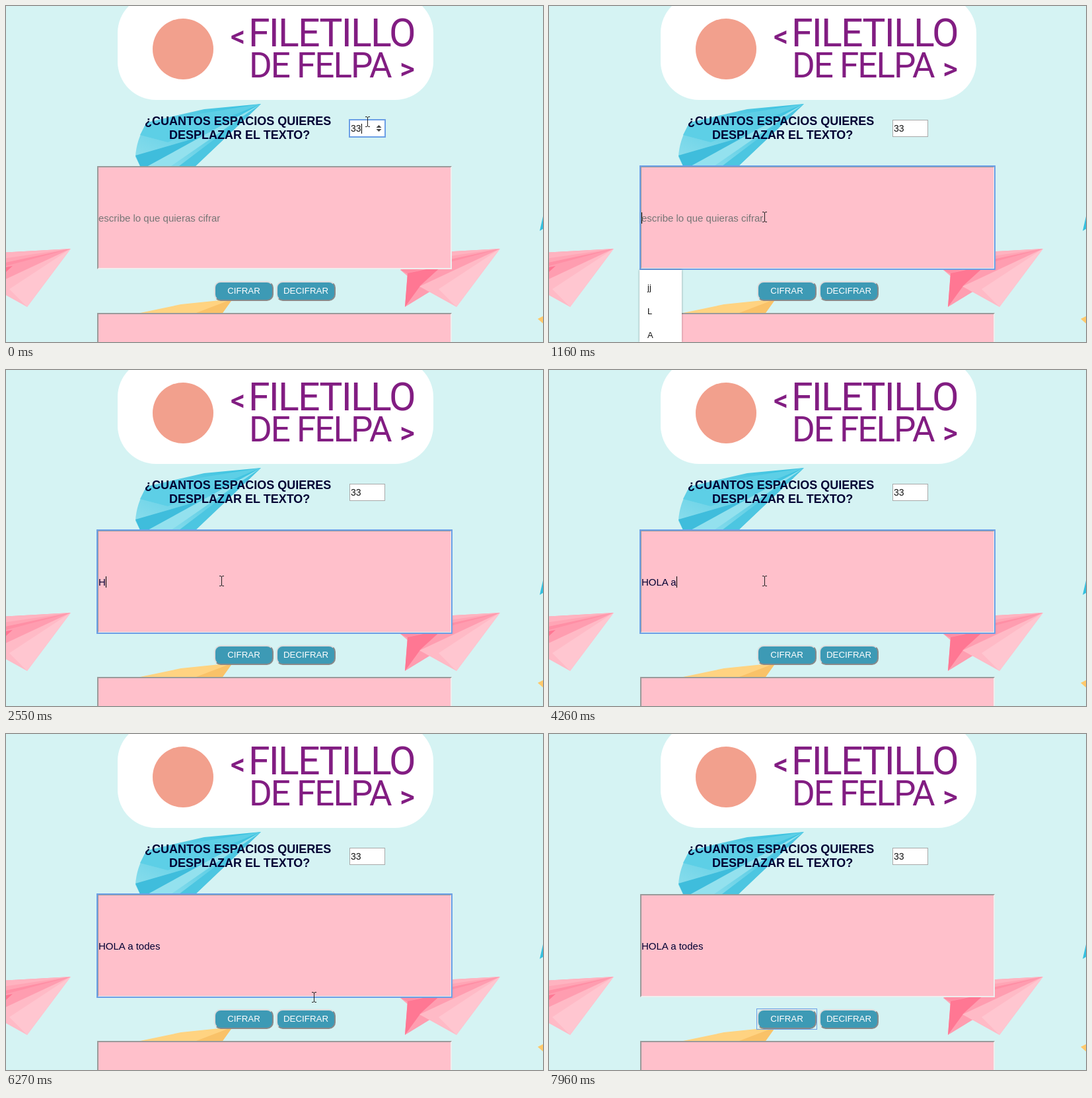
Write an HTML page that moves like this. It is 813 px wide and 508 px high and loops after 8000 ms.

```html
<!DOCTYPE html>
<html lang="es">
<head>
<meta charset="utf-8">
<title>Cifrado</title>
<style>
  html, body { margin: 0; width: 100%; height: 100%; overflow: hidden; background: #d5f3f3; }
  body { position: relative; font-family: "Liberation Sans", Arial, sans-serif; }
  svg, div { position: absolute; box-sizing: border-box; }
  svg { left: 0; top: 0; display: block; }
  .logo { font-family: Roboto, sans-serif; fill: #821d82; }
  .heading { font-size: 18px; font-weight: bold; fill: #000033; }
  .box { left: 138px; width: 537px; height: 156px; background: #ffc0cb; border: 2px inset #eee; }
  #result { top: 464px; height: 44px; border-bottom: 0; }
  .ring { border: 2px solid #6c9fe6; }
  .line { white-space: pre; color: #000033; }
  .line i { display: inline-block; width: 1px; margin-right: -1px; background: #000; vertical-align: top; }
  #message { left: 140px; top: 312px; font-size: 15px; line-height: 17px; }
  #message i { height: 17px; }
  #hint { color: #757575; }
  #number { left: 520px; top: 172px; width: 54px; height: 26px; background: #fff; border: 1px solid #a9a9a9; }
  #shift { left: 522px; top: 178px; font-size: 14px; line-height: 15px; color: #111; }
  #shift i { height: 15px; }
  .button { top: 416px; width: 90px; height: 30px; border: 2px outset #ddd; border-radius: 10px;
    background: #3d9ab5; color: #fff; font-size: 13.333px; line-height: 26px; text-align: center; }
  #menu { left: 137px; top: 399px; width: 64px; height: 109px; background: #fff;
    box-shadow: 0 0 3px rgba(0,0,0,.35); font-size: 13px; line-height: 36px; padding: 9px 12px 0; color: #111;
    overflow: hidden; }
</style>
</head>
<body>
<svg width="813" height="508">
  <defs>
    <g id="pinkPlane">
      <path fill="#ffa5b5" d="M748 367L625 374L597 399L626 424Z"/>
      <path fill="#ffb3c0" d="M748 367L640 373L618 386Z"/>
      <path fill="#ff8fa5" d="M748 367L597 399L610 406L626 414Z"/>
      <path fill="#ff9db0" d="M748 367L604 455L608 404Z"/>
      <path fill="#ff7793" d="M660 393L608 404L604 455L628 422Z"/>
      <path fill="#ffbac6" d="M748 367L626 424L682 455Z"/>
      <path fill="#ffc6d0" d="M748 367L655 428L682 455Z"/>
    </g>
    <linearGradient id="cyan" x1="0" y1="1" x2="1" y2="0">
      <stop offset="0" stop-color="#8fdfed"/><stop offset="1" stop-color="#35c0df"/>
    </linearGradient>
  </defs>
  <path fill="url(#cyan)" d="M386 148L300 156L213 176Q197 203 196 228L203 242H287Z"/>
  <path fill="#5dcfe6" d="M386 148L213 176L203 195L245 206Z"/>
  <path fill="#3fbddc" d="M300 196L196 226L203 242H215Z"/>
  <path fill="#93e1ee" d="M386 148L215 242H250Z"/>
  <path fill="#4cc6e1" d="M386 148L262 242H287Z"/>
  <path fill="#35c0df" d="M813 318L808 340L813 337Z"/>
  <use href="#pinkPlane"/>
  <use href="#pinkPlane" x="-650"/>
  <path fill="#ffd381" d="M343 443L265 451L203 464H328Z"/>
  <path fill="#f9c268" d="M343 443L288 464H328Z"/>
  <path fill="#ffc96b" d="M813 469L805 473L813 480Z"/>

  <rect x="169" y="-17" width="478" height="159" rx="58" fill="#fff"/>
  <circle cx="268" cy="65" r="46" fill="#f2a08d"/>
  <g class="logo">
    <text x="340" y="61" font-size="44" font-weight="500">&lt;</text>
    <text x="367" y="61" font-size="59" letter-spacing="-1.8">FILETILLO</text>
    <text x="368" y="108" font-size="53" letter-spacing="-2">DE FELPA</text>
    <text x="596" y="110" font-size="44" font-weight="500">&gt;</text>
  </g>
  <text class="heading" x="210" y="180">¿CUANTOS ESPACIOS QUIERES</text>
  <text class="heading" x="247" y="201">DESPLAZAR EL TEXTO?</text>
</svg>

<div id="number"></div>
<div id="shift" class="line">33<i></i></div>
<div id="numberRing" class="ring" style="left:519px;top:171px;width:56px;height:28px"></div>
<div class="box" style="top:242px"></div>
<div id="messageRing" class="ring" style="left:137px;top:241px;width:539px;height:158px"></div>
<div id="message" class="line"><span id="typed"></span><i></i><span id="hint">escribe lo que quieras cifrar</span></div>
<div class="box" id="result"></div>
<div class="button" id="encrypt" style="left:315px">CIFRAR</div>
<div class="button" style="left:409px">DECIFRAR</div>
<div id="buttonRing" class="ring" style="left:314px;top:415px;width:92px;height:32px;border-width:1px"></div>
<div id="menu">jj<br>L<br>A</div>

<svg width="813" height="508">
  <path id="spinner" fill="#444" d="M560.5 184L564.5 180L568.5 184ZM560.5 186L564.5 190L568.5 186Z"/>
  <path id="beam" fill="none" stroke="#222" d="M-3 -7.5H-1L.5 -6.5L2 -7.5H4M.5 -7V7M-3 7.5H-1L.5 6.5L2 7.5H4"/>
  <path id="arrow" fill="#fff" stroke="#000" d="M.5 .5V16.2L4.2 12.8L6.6 18.4L9 17.4L6.6 11.9H11.4Z"/>
</svg>

<script>
  const LOOP = 8000;
  const MESSAGE = "HOLA a todes";
  const KEY_TIMES = [2550, 2680, 3400, 3520, 3960, 4260, 4530, 4780, 5060, 5190, 5320, 5580];
  const CARET_OFF = [[1700, 2250], [3270, 3400], [6000, 6570]];
  // time, pointer shape, position
  const POINTER = [
    [0, "beam", 547, 175], [430, "arrow", 486, 214], [560, "beam", 421, 259],
    [710, "beam", 418, 261], [860, "beam", 371, 291], [1010, "beam", 329, 318],
    [1160, "beam", 326, 319], [6120, "arrow", 416, 403], [6270, "beam", 466, 398],
    [6420, "arrow", 393, 447], [6570, "arrow", 384, 441], [6700, "arrow", 375, 436],
    [6860, "arrow", 371, 434], [7560, "arrow", 431, 65], [7710, "arrow", 445, 30],
    [7835, "arrow", 450, 4], [7960, "none", 0, 0]
  ];

  const byId = id => document.getElementById(id);
  const show = (element, visible) => { element.style.visibility = visible ? "visible" : "hidden"; };
  const numberCaret = document.querySelector("#shift i");
  const messageCaret = document.querySelector("#message i");

  function render(t) {
    const within = (from, to) => t >= from && t < to;
    const count = KEY_TIMES.filter(time => time <= t).length;
    const messageFocused = within(1160, 7000);

    show(byId("numberRing"), t < 1160);
    show(byId("spinner"), t < 1160);
    show(numberCaret, t < 1010);

    byId("typed").textContent = MESSAGE.slice(0, count);
    show(byId("hint"), count === 0);
    show(byId("messageRing"), messageFocused);
    show(messageCaret, messageFocused && !CARET_OFF.some(([from, to]) => within(from, to)));
    show(byId("menu"), within(1160, 2550));

    show(byId("buttonRing"), t >= 7000);
    byId("encrypt").style.borderStyle = within(7000, 7130) ? "inset" : "outset";

    const [, shape, x, y] = POINTER.filter(([time]) => time <= t).pop();
    for (const id of ["beam", "arrow"]) {
      show(byId(id), id === shape);
      byId(id).setAttribute("transform", `translate(${x} ${y})`);
    }
  }

  const start = performance.now();
  function tick() {
    render((performance.now() - start) % LOOP);
    requestAnimationFrame(tick);
  }
  tick();
</script>
</body>
</html>
```
